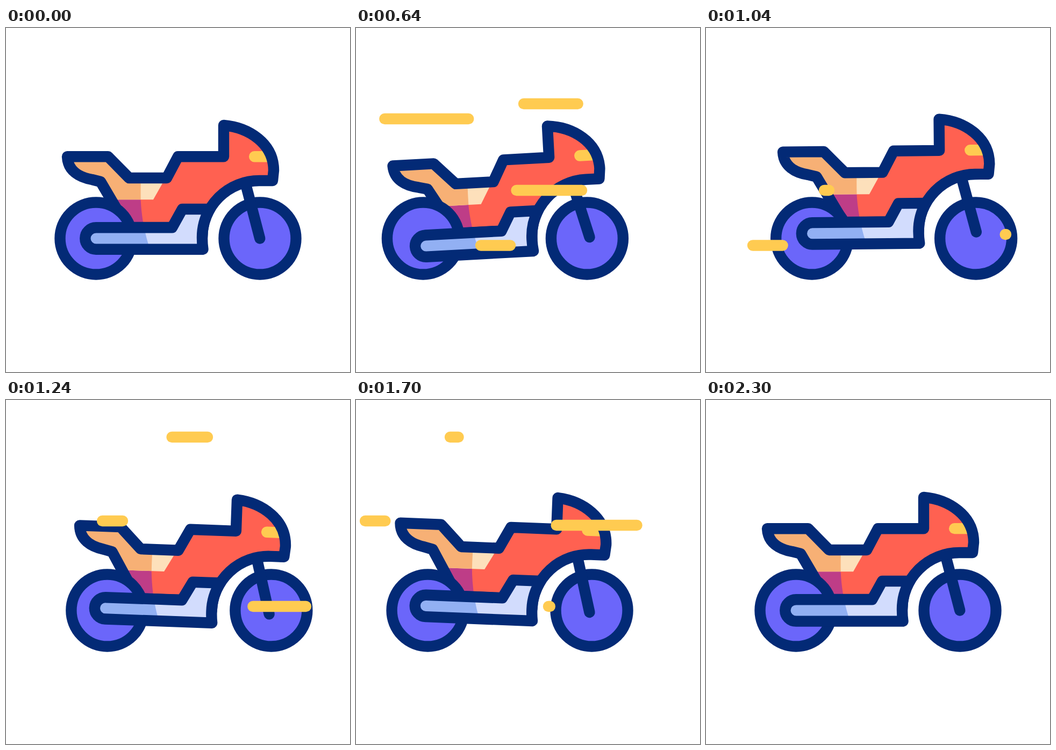
Recreate the animation shown at these times as an HTML page. Size 640 px wide and 640 px high, loop 2.4 s.

```html
<!DOCTYPE html>
<html lang="en">
<head>
<meta charset="utf-8">
<title>Motorbike</title>
<style>
  html, body { margin: 0; width: 100%; height: 100%; overflow: hidden; background: #fff; }
  svg { display: block; width: 100vw; height: 100vh; }
  .line { stroke: #032a76; stroke-width: 20.4; stroke-linecap: round; stroke-linejoin: round; }
  .wheel { fill: #6b66fa; }
  #streaks { stroke: #ffcb51; stroke-width: 20.4; stroke-linecap: round; }
</style>
</head>
<body>
<svg viewBox="0 0 640 640">
  <defs>
    <path id="shell" d="M114 239.3H190L229 279H299L320 239.3H405V181C452 185 498 215 498 265L496 284H471A106 106 0 0 0 365 390L366 371H226L176 286L160 282C137 278 115 266 114 239.3Z"/>
    <path id="pipe" d="M366.5 411.7H167.5A20.2 20.2 0 0 1 167.5 371.3H309L328 337H379A106 106 0 0 0 365 390Q365 402 366.5 411.7Z"/>
    <clipPath id="inShell"><use href="#shell"/></clipPath>
    <clipPath id="inPipe"><use href="#pipe"/></clipPath>
    <path id="shade" d="M90 220H253C249 290 246 340 265 403V420H90Z"/>
  </defs>

  <circle class="wheel line" cx="472.5" cy="391.5" r="67"/>
  <g class="frame">
    <path class="line" d="M445 287L472.3 391.5"/>
    <g clip-path="url(#inShell)">
      <path fill="#ff6151" d="M90 160H520V420H90Z"/>
      <use href="#shade" fill="#be3d87"/>
      <path fill="#fde0bb" d="M90 220H330L274 319.3H90Z"/>
      <path fill="#f7b075" d="M90 220H253Q250 285 250.7 319.3H90Z"/>
      <rect fill="#ffcb51" x="452" y="229" width="60" height="20.4" rx="10.2"/>
    </g>
    <use href="#shell" class="line" fill="none"/>
  </g>
  <circle class="wheel line" cx="167.5" cy="391.5" r="67"/>
  <g class="frame">
    <use href="#pipe" fill="#d2dcfd"/>
    <use href="#shade" fill="#92b0f3" clip-path="url(#inPipe)"/>
    <use href="#pipe" class="line" fill="none"/>
  </g>
  <g id="streaks"></g>
</svg>
<script>
const LOOP = 2400, TRAVEL = 200, DURATION = 450, LAG = 267;

const ease = u => (1 - Math.cos(Math.PI * Math.min(1, Math.max(0, u)))) / 2;

// Eases from rest through evenly spaced peaks and back to rest
function swing(t, start, step, ...peaks) {
  let value = 0;
  [...peaks, 0].forEach((peak, i) => {
    value += (peak - (peaks[i - 1] || 0)) * ease((t - start) / step - i);
  });
  return value;
}

// A wave sends out one streak per gap, each from its own [x, y]
const streaks = [];
function wave(start, gap, ...origins) {
  origins.forEach(([x, y], i) => {
    const line = document.createElementNS("http://www.w3.org/2000/svg", "line");
    line.setAttribute("y1", y);
    line.setAttribute("y2", y);
    document.getElementById("streaks").append(line);
    streaks.push({ line, x, start: start + i * gap });
  });
}
wave(150, 98, [512, 141], [245.5, 169]);
wave(385, 98, [420, 302], [287, 404.5]);
wave(1018, 47, [558, 384], [375, 69], [217, 225]);
wave(1290, 0, [569, 233]);

function drawStreak({ line, x, start }, t) {
  const age = t - start;
  const visible = age >= 0 && age <= DURATION + LAG;
  line.setAttribute("visibility", visible ? "visible" : "hidden");
  line.setAttribute("x1", x - TRAVEL * ease(age / DURATION));
  line.setAttribute("x2", x - TRAVEL * ease((age - LAG) / DURATION) + 0.01);
}

const wheels = document.querySelectorAll(".wheel");
const frames = document.querySelectorAll(".frame");

function draw(now) {
  const t = now % LOOP;
  const shift = swing(t, 40, 530, -46, 32, -35.5);
  const bob = swing(t, 30, 460, 12.8, -12.2, 6.5, -7);
  const tilt = swing(t, 0, 720, -3.2, 3.2);

  wheels.forEach(w => w.setAttribute("transform", `translate(${shift} 0)`));
  frames.forEach(f => f.setAttribute("transform",
    `translate(${shift} ${bob}) rotate(${tilt} 306 297)`));
  streaks.forEach(s => drawStreak(s, t));
  requestAnimationFrame(draw);
}
draw(performance.now());
</script>
</body>
</html>
```
